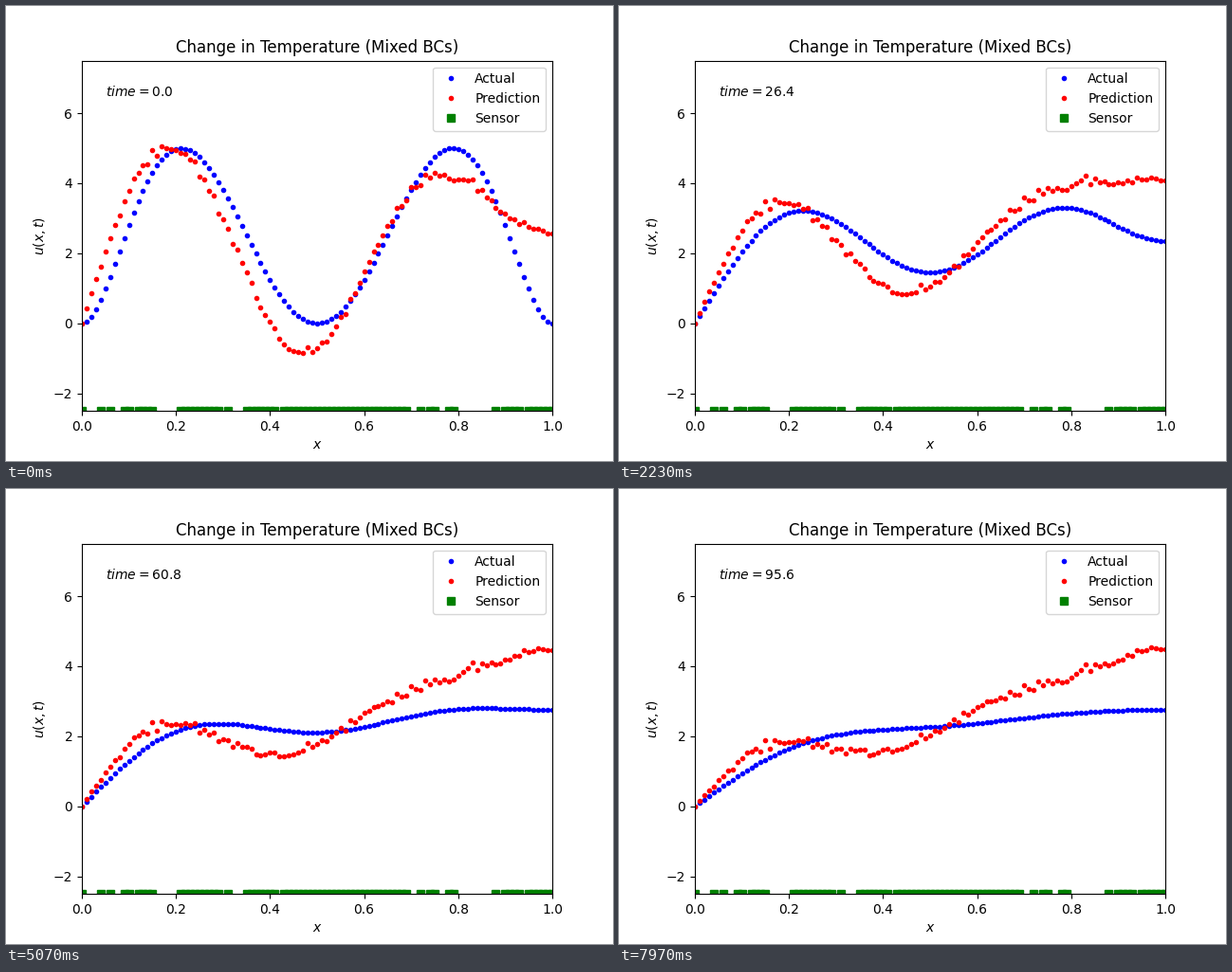
These frames come from a looping animation (640x480 px, 8000 ms). A matplotlib script:

```python
import numpy as np
import matplotlib.pyplot as plt
from matplotlib.animation import FuncAnimation

FRAMES, LOOP_MS, DT = 240, 8000, 0.4
T_END = (FRAMES - 1) * DT
ALPHA = 3e-4  # thermal diffusivity

x = np.linspace(0, 1, 101)


def modes(pos, count):
    """Eigenfunctions for u(0)=0, u'(1)=0, with their wave numbers."""
    k = (np.arange(count) + 0.5) * np.pi
    return np.sin(np.outer(pos, k)), k


# Exact solution: project the starting profile and let each mode decay
fine = np.linspace(0, 1, 2001)
start = 540 * (fine * (1 - fine) * (1 - 2 * fine)) ** 2
fine_modes, _ = modes(fine, 60)
weights = 2 * (start @ fine_modes) * (fine[1] - fine[0])
grid_modes, wave = modes(x, 60)


def actual(t):
    return grid_modes @ (weights * np.exp(-ALPHA * wave ** 2 * t))


# Prediction: a settled profile, fading low modes and fixed noise
low_modes, _ = modes(x, 6)
settled = np.array([3.82, -0.23, 0.53, 0.34, 0.21, -0.03])
fading = np.array([-0.64, 0.65, 1.74, 2.01, -0.34, -0.10])
rates = np.array([0.08, 0.0175, 0.0175, 0.032, 0.08, 0.08])
noise = np.random.default_rng(4).normal(0, 0.07, x.size) * np.minimum(1, 8 * x)


def prediction(t):
    fade = np.exp(-rates * t) - np.exp(-rates * T_END)
    return low_modes @ (settled + fading * fade) + noise


# Grid points without a sensor
gaps = np.r_[1:4, 5, 7:9, 11, 16:21, 30, 32:35, 42, 70:72, 73, 76:78,
             80:88, 89, 94]
sensors = np.delete(x, gaps)

fig, ax = plt.subplots(figsize=(6.4, 4.8), dpi=100)
blue, = ax.plot(x, actual(0), 'b.', label='Actual')
red, = ax.plot(x, prediction(0), 'r.', label='Prediction')
ax.plot(sensors, np.full(sensors.size, -2.5), 'gs', label='Sensor')
clock = ax.text(0.05, 6.5, '')
ax.set(xlim=(0, 1), ylim=(-2.5, 7.5), xlabel='$x$', ylabel='$u(x,t)$',
       title='Change in Temperature (Mixed BCs)')
ax.legend(loc='upper right')


def draw(i):
    t = i * DT
    blue.set_ydata(actual(t))
    red.set_ydata(prediction(t))
    clock.set_text(f'$time = {t:.1f}$')
    return blue, red, clock


anim = FuncAnimation(fig, draw, frames=FRAMES, interval=LOOP_MS / FRAMES,
                     repeat=True, repeat_delay=0)
plt.show()
```
